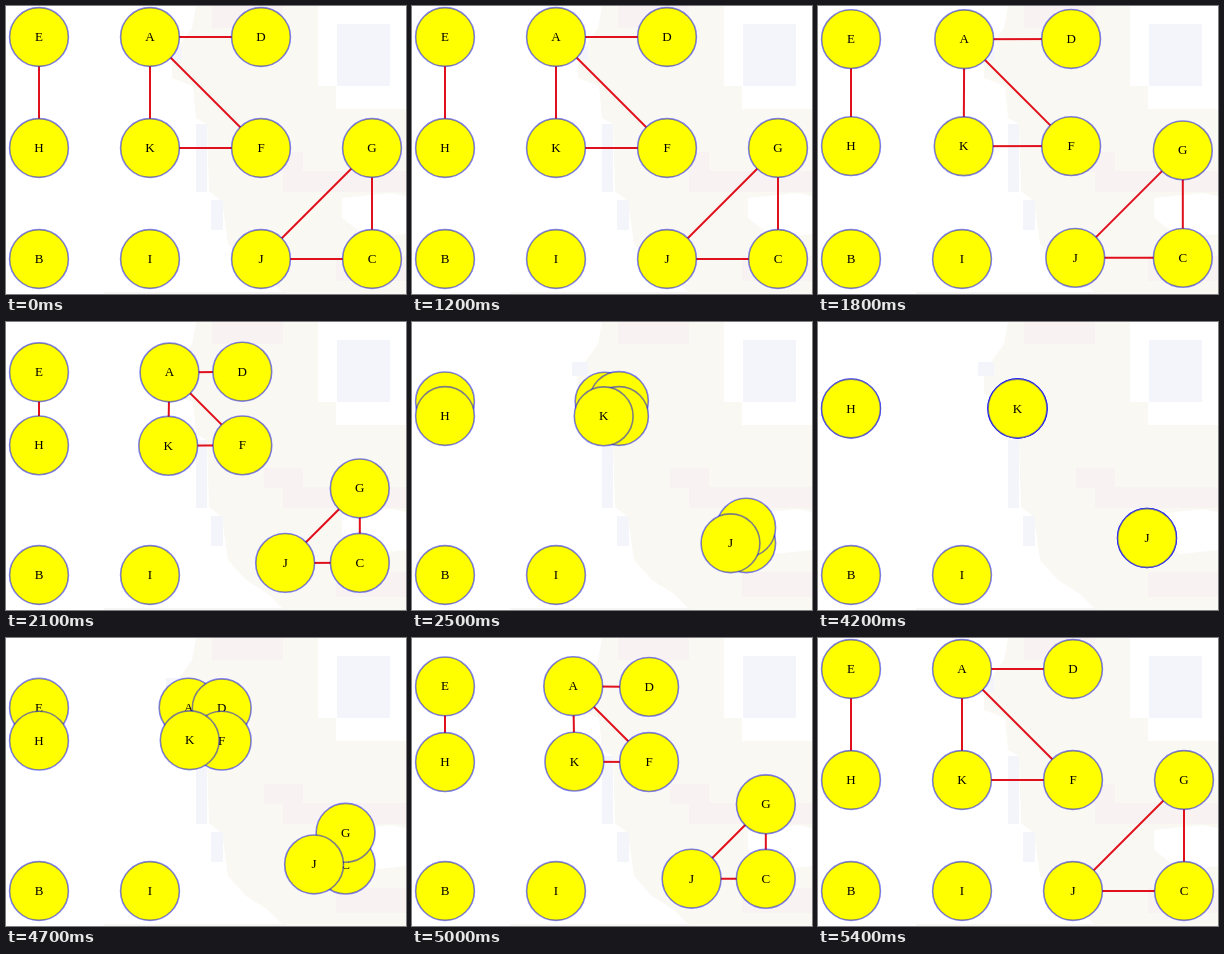
An HTML page with a canvas that plays this animation: 400 px wide and 288 px high, repeating every 5.5 s.

```html
<!DOCTYPE html>
<html lang="en">
<head>
<meta charset="utf-8">
<title>Graph components</title>
<style>
html, body { margin: 0; width: 100%; height: 100%; overflow: hidden; background: #fff; }
canvas { display: block; width: 400px; height: 288px; }
</style>
</head>
<body>
<canvas id="stage" width="400" height="288"></canvas>
<script>
const ctx = document.getElementById('stage').getContext('2d');
const LOOP = 5500, STEP = 100;
const CREAM = '#faf8f3', LILAC = '#f4f4fb', PINK = '#f8f2f2';

// name: column, row, group, start delay in ms
const nodes = {
  A: [1, 0, 'ADFK', 0],
  B: [0, 2, 'B', 0],
  C: [3, 2, 'CGJ', 16],
  D: [2, 0, 'ADFK', 10],
  E: [0, 0, 'EH', 3],
  F: [2, 1, 'ADFK', 11],
  G: [3, 1, 'CGJ', 15],
  H: [0, 1, 'EH', 11],
  I: [1, 2, 'I', 0],
  J: [2, 2, 'CGJ', 18],
  K: [1, 1, 'ADFK', 17]
};
const edges = ['AD', 'AF', 'AK', 'CG', 'CJ', 'EH', 'FK', 'GJ'];

const home = name => ({ x: 33 + 111 * nodes[name][0], y: 31 + 111 * nodes[name][1] });

function centre(group) {
  const pts = [...group].map(home);
  const mean = key => pts.reduce((sum, p) => sum + p[key], 0) / pts.length;
  return { x: mean('x'), y: mean('y') };
}

const clamp = v => Math.min(1, Math.max(0, v));
const ease = u => (1 - Math.cos(Math.PI * clamp(u))) / 2;

// 0 = spread out, 1 = stacked
function gather(t) {
  if (t < 4000) return ease((t - 1660) / 1090);
  const u = t < 5000 ? 0.624 * (t - 4257) / 743 : 0.624 + 0.376 * (t - 5000) / 316;
  return 1 - ease(u);
}

function place(name, t) {
  const [, , group, delay] = nodes[name];
  const a = home(name), b = centre(group), p = gather(t - delay);
  return { x: a.x + (b.x - a.x) * p, y: a.y + (b.y - a.y) * p };
}

function shape(color, pts) {
  ctx.fillStyle = color;
  ctx.beginPath();
  for (let i = 0; i < pts.length; i += 2) ctx.lineTo(pts[i], pts[i + 1]);
  ctx.fill();
}

function box(color, x, y, w, h) {
  ctx.fillStyle = color;
  ctx.fillRect(x, y, w, h);
}

function backdrop() {
  box('#fff', 0, 0, 400, 288);
  shape(CREAM, [190, 0, 312, 0, 312, 80, 330, 80, 330, 103, 400, 103, 400, 288,
    278, 288, 262, 272, 240, 258, 222, 238, 216, 195, 203, 185, 201, 118,
    190, 112, 187, 80, 166, 72, 166, 50, 186, 22]);
  box(PINK, 206, 0, 71, 22);
  box(PINK, 258, 146, 39, 20);
  box(PINK, 277, 165, 123, 21);
  box(PINK, 330, 250, 70, 25);
  shape('#fff', [336, 192, 385, 187, 400, 190, 400, 228, 362, 232, 336, 212]);
  box(LILAC, 331, 18, 53, 62);
  box(LILAC, 190, 118, 11, 68);
  box(LILAC, 205, 194, 12, 30);
  box(LILAC, 160, 40, 16, 14);
  box('#f7f6f5', 98, 286, 182, 2);
}

function drawEdge([a, b], t) {
  const p = place(a, t), q = place(b, t);
  ctx.strokeStyle = '#e0101c';
  ctx.lineWidth = 2;
  ctx.beginPath();
  ctx.moveTo(p.x, p.y);
  ctx.lineTo(q.x, q.y);
  ctx.stroke();
}

function drawNode(name, t) {
  const { x, y } = place(name, t);
  ctx.beginPath();
  ctx.arc(x, y, 29.4, 0, 2 * Math.PI);
  ctx.fillStyle = '#ffff00';
  ctx.fill();
  ctx.strokeStyle = 'rgba(0, 0, 255, 0.5)';
  ctx.lineWidth = 1.6;
  ctx.stroke();
  ctx.fillStyle = '#000';
  ctx.fillText(name, x, y + 4);
}

function frame(now) {
  const t = Math.floor(now % LOOP / STEP) * STEP;
  ctx.font = '13px "Liberation Serif", serif';
  ctx.textAlign = 'center';
  backdrop();
  edges.forEach(edge => drawEdge(edge, t));
  Object.keys(nodes).forEach(name => drawNode(name, t));
}

const start = performance.now();
function tick() {
  frame(performance.now() - start);
  requestAnimationFrame(tick);
}
tick();
</script>
</body>
</html>
```
